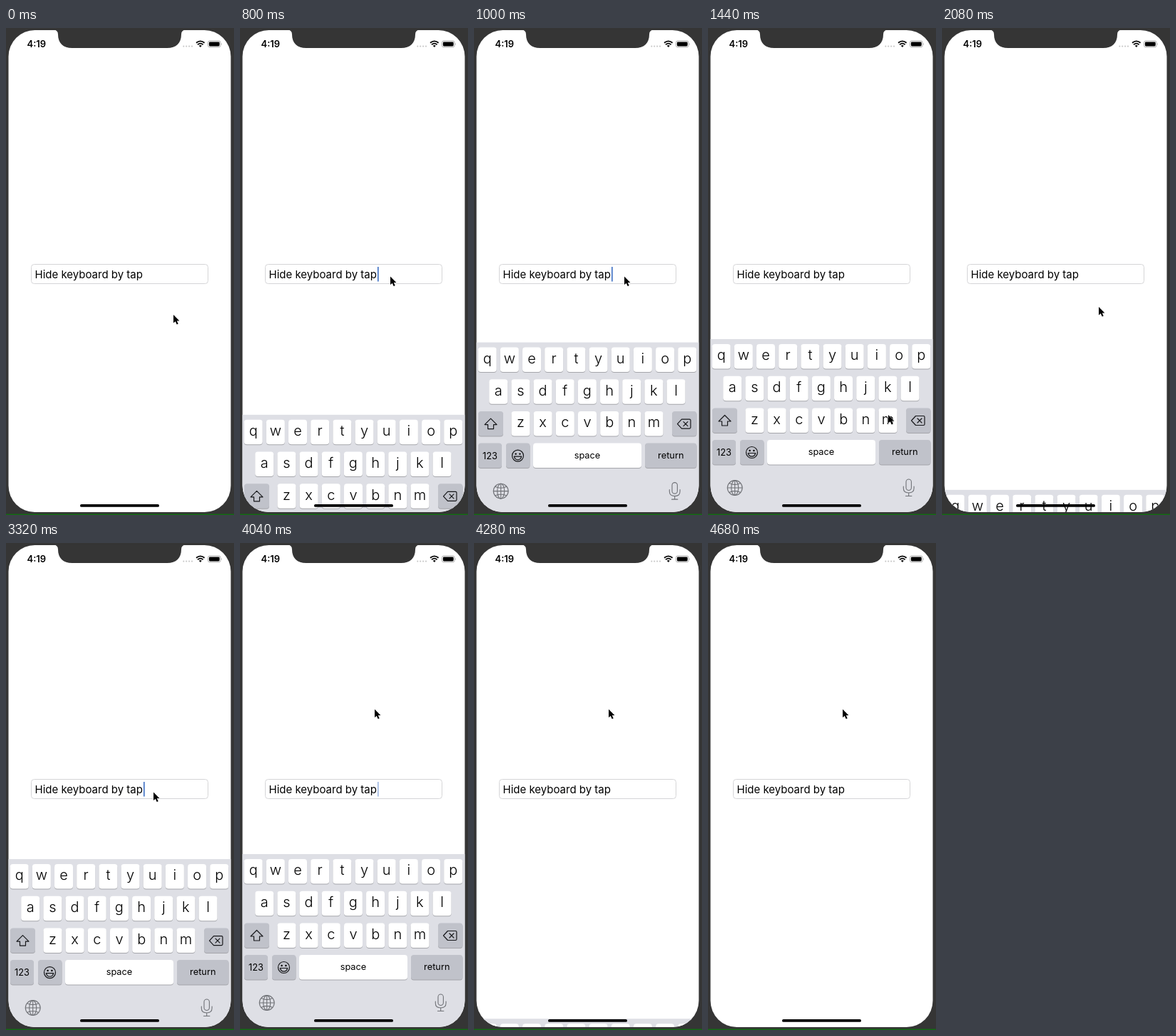
Write an HTML page that moves like this. It is 320 by 681 pixels and loops after 5160 ms.

```html
<!DOCTYPE html>
<html lang="en">
<head>
<meta charset="utf-8">
<title>Hide keyboard by tap</title>
<style>
  html, body { margin: 0; width: 100%; height: 100%; overflow: hidden; background: #353535; }
  svg { display: block; width: 320px; height: 681px; font-family: Inter, sans-serif; }
  .letter { font-size: 20px; font-weight: 300; text-anchor: middle; }
  .label { font-size: 12.8px; text-anchor: middle; }
  .line { fill: none; stroke: #16171a; stroke-width: 1.2; stroke-linejoin: round; stroke-linecap: round; }
  .gray { stroke: #707277; stroke-width: 1.1; }
</style>
</head>
<body>
<svg viewBox="0 0 320 681">
  <clipPath id="screen"><rect x="3.5" y="3" width="312" height="674" rx="37"/></clipPath>
  <rect width="320" height="681" fill="#353535"/>
  <rect y="679.5" width="320" height="1.5" fill="#146b14"/>
  <g clip-path="url(#screen)">
    <rect width="320" height="681" fill="#fff"/>
    <rect x="35.5" y="330.5" width="248" height="27" rx="4" fill="#fff" stroke="#d5d5d7"/>
    <text x="40.5" y="350" font-size="15">Hide keyboard by tap</text>
    <rect id="caret" x="193" y="334" width="1.6" height="20.5" fill="#3d6fc4"/>
    <g id="keyboard"></g>
    <rect x="104" y="666" width="111" height="3.8" rx="1.9"/>
  </g>
  <path d="M67 2.5Q73 3 73 9C73 21 80 28 93 28H226C239 28 246 21 246 9Q246 3 252 2.5Z" fill="#353535"/>

  <text x="29.5" y="27" font-size="13" font-weight="600">4:19</text>
  <g fill="#c9c9c9">
    <circle cx="249.3" cy="25.6" r="1.1"/><circle cx="253.2" cy="25.6" r="1.1"/>
    <circle cx="257.1" cy="25.6" r="1.1"/><circle cx="261" cy="25.6" r="1.1"/>
  </g>
  <g fill="none" stroke="#000" stroke-width="1.8">
    <path d="M267 20.8Q272.8 16 278.6 20.8M269 23.2Q272.8 20 276.6 23.2"/>
    <path d="M270.8 24.8Q272.8 23.2 274.8 24.8L272.8 27Z" fill="#000" stroke="none"/>
  </g>
  <rect x="283.5" y="18" width="17.6" height="8.8" rx="2.4" fill="none" stroke="#a5a5a5" stroke-width=".9"/>
  <rect x="284.9" y="19.4" width="14.8" height="6" rx="1.3"/>
  <path d="M302 21Q303.6 22.4 302 23.9Z" fill="#a5a5a5"/>

  <path id="pointer" d="M0 0V11.6L2.7 9.2L4.7 13.6L6.7 12.7L4.8 8.4H8.4Z" stroke="#fff" stroke-width="1" paint-order="stroke"/>
</svg>
<script>
const LOOP = 5160, STEP = 40, TRAVEL = 244;
const $ = id => document.getElementById(id);

const key = (x, y, w, fill = '#fff') =>
  `<rect x="${x}" y="${y + 1}" width="${w}" height="34.5" rx="4" fill="#a5a6ab"/>
   <rect x="${x}" y="${y}" width="${w}" height="34.5" rx="4" fill="${fill}"/>`;
const label = (text, x, y, kind = 'label') => `<text class="${kind}" x="${x}" y="${y}">${text}</text>`;
const line = (d, kind = '') => `<path class="line ${kind}" d="${d}"/>`;

const letters = ['qwertyuiop', 'asdfghjkl', 'zxcvbnm'].map((row, r) =>
  [...row].map((char, i) => {
    const x = [18.7, 34.2, 65.5][r] + i * 31.17, y = 442 + r * 44.7;
    return key(x - 13, y, 26) + label(char, x, y + 22.4, 'letter');
  }).join('')).join('');

const dark = '#c0c2ca';
$('keyboard').innerHTML = `
  <rect y="435" width="320" height="246" fill="#dedfe5"/>
  ${letters}
  ${key(6, 531.4, 35, dark)}${key(278, 531.4, 34.5, dark)}
  ${key(6, 576, 33, dark)}${key(45, 576, 33.5, dark)}
  ${key(83, 576, 152)}${key(240, 576, 72.5, dark)}
  ${label('123', 22.5, 598)}${label('space', 159, 597.4)}${label('return', 276.3, 597.4)}
  ${line('M23.5 541.5L32 550H27.5V556H19.5V550H15Z')}
  ${line('M285.5 549L291.5 542.5H302.5Q304 542.5 304 544V554Q304 555.5 302.5 555.5H291.5ZM294 546L300 552M300 546L294 552')}
  <circle class="line" cx="61.5" cy="593.5" r="8"/>
  <circle cx="58.6" cy="591" r="1.2"/><circle cx="64.4" cy="591" r="1.2"/>
  ${line('M56.3 594.5H66.7Q65.5 599.2 61.5 599.2T56.3 594.5Z')}
  <circle class="line gray" cx="37.7" cy="643" r="10.4"/>
  <ellipse class="line gray" cx="37.7" cy="643" rx="5" ry="10.4"/>
  ${line('M37.7 632.6V653.4M27.3 643H48.1M29.8 636.6Q37.7 640.6 45.6 636.6M29.8 649.4Q37.7 645.4 45.6 649.4', 'gray')}
  <rect class="line gray" x="278" y="631" width="7.4" height="15.5" rx="3.7"/>
  ${line('M274.3 641V643.5Q274.3 650 281.7 650T289.1 643.5V641M281.7 650V654.5M277.5 654.5H285.9', 'gray')}`;

// Pointer stops: time, x, y
const stops = [
  [160, 235, 401], [480, 211, 347.5], [1240, 211, 347.5], [1440, 253, 541],
  [1540, 270, 582], [1800, 220, 390], [2440, 220, 390], [2800, 207, 348.5],
  [3440, 207, 348.5], [3640, 176, 256], [3760, 189, 232.5]
];
const clamp = v => Math.min(1, Math.max(0, v));
const smooth = v => v * v * (3 - 2 * v);

function pointerAt(t) {
  const next = stops.findIndex(s => s[0] > t);
  if (next < 0) return stops.at(-1).slice(1);
  if (next === 0) return stops[0].slice(1);
  const [t0, x0, y0] = stops[next - 1], [t1, x1, y1] = stops[next];
  const k = smooth((t - t0) / (t1 - t0));
  return [x0 + (x1 - x0) * k, y0 + (y1 - y0) * k];
}

// Critically damped spring from 0 to 1
function spring(ms) {
  const x = Math.max(0, ms) * 0.02;
  return 1 - (1 + x) * Math.exp(-x);
}

function caretOpacity(t) {
  const shown = t >= 720 && t < 1920 ? t - 720 : t >= 3080 && t < 4080 ? t - 3080 : -1;
  if (shown < 0) return 0;
  return shown < 800 ? 1 - clamp((shown - 540) / 140) : clamp((shown - 925) / 70);
}

function render(now) {
  const t = Math.floor(now % LOOP / STEP) * STEP;
  const open = spring(t - 705) - spring(t - 1905) + spring(t - 3050) - spring(t - 4050);
  $('keyboard').setAttribute('transform', `translate(0 ${TRAVEL * (1 - open)})`);
  $('caret').setAttribute('opacity', caretOpacity(t));
  $('pointer').setAttribute('transform', `translate(${pointerAt(t)})`);
}

const start = performance.now();
function tick() {
  render(performance.now() - start);
  requestAnimationFrame(tick);
}
tick();
</script>
</body>
</html>
```
